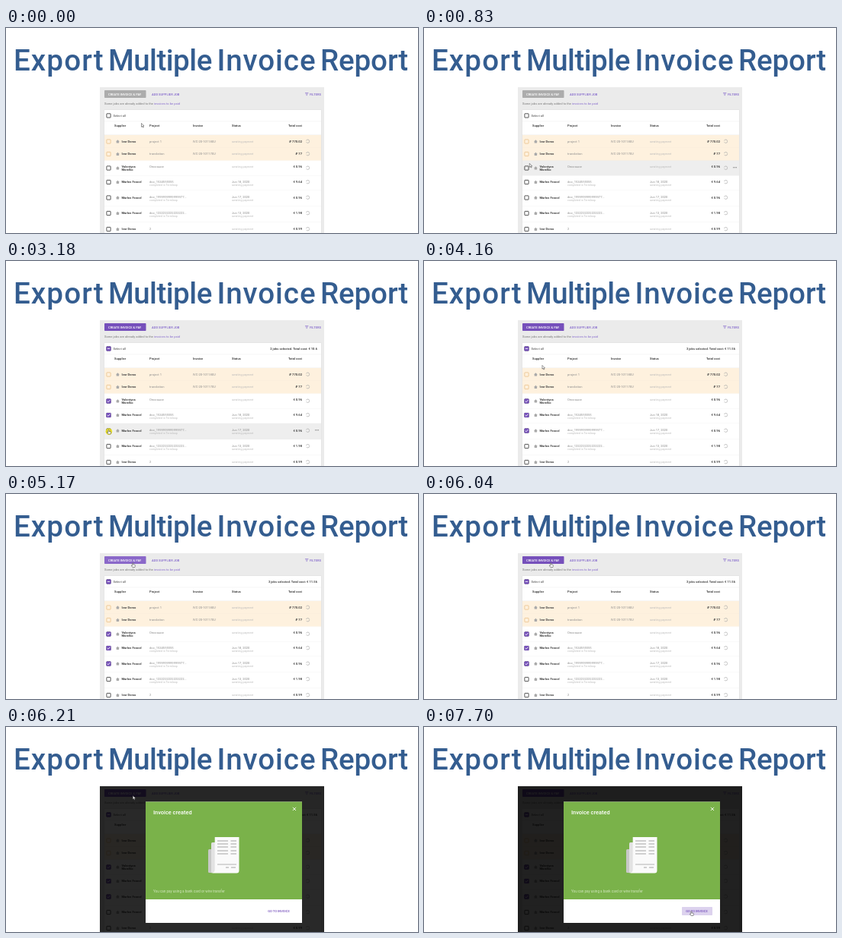
Recreate the animation shown at these times as an HTML page. Size 540x270 px, loop 8000 ms.

```html
<!DOCTYPE html>
<html lang="en">
<head>
<meta charset="utf-8">
<title>Export Multiple Invoice Report</title>
<style>
html, body { margin: 0; width: 100%; height: 100%; overflow: hidden; background: #fff; }
svg { display: block; width: 100vw; height: 100vh; font: 4.1px Roboto, sans-serif; }
.title { font-size: 38.5px; font-weight: 500; }
.bold { font-weight: 700; }
.medium { font-weight: 500; }
.small { font-size: 3.6px; }
.end { text-anchor: end; }
</style>
</head>
<body>
<svg id="stage" viewBox="0 0 540 270"></svg>
<script>
const LOOP = 8000;
const PURPLE = '#7650bb', LINK = '#8468cc', DARK = '#444', GREY = '#8c8c8c', PALE = '#b9b9b9';

const text = (x, y, str, fill = DARK, cls = '', extra = '') =>
  `<text x="${x}" y="${y}" fill="${fill}" class="${cls}" ${extra}>${str}</text>`;
const rect = (x, y, w, h, fill, extra = '') =>
  `<rect x="${x}" y="${y}" width="${w}" height="${h}" fill="${fill}" ${extra}/>`;
const line = (x1, y, x2, stroke, width = .5) =>
  `<path d="M${x1} ${y}H${x2}" stroke="${stroke}" stroke-width="${width}"/>`;

const rows = [
  { top: 141, mid: 149.5, name: ['Ivor Demo'], project: 'project 1', invoice: 'IVC-20-10118EU', cost: '₽ 770.02', added: true },
  { top: 157.5, mid: 166, name: ['Ivor Demo'], project: 'translation', invoice: 'IVC-20-10117EU', cost: '₽ 77', added: true },
  { top: 174.5, mid: 184.5, name: ['Valentyna', 'Morelko'], project: 'Описание', cost: '€ 0.96', checkAt: 1460 },
  { top: 194.5, mid: 203, name: ['Marlen Fennel'], project: 'doc_1534555555', date: 'Jun 18, 2020', cost: '€ 9.64', checkAt: 2490 },
  { top: 214, mid: 223.5, name: ['Marlen Fennel'], project: 'doc_1999999999999977...', date: 'Jun 17, 2020', cost: '€ 0.96', checkAt: 3330 },
  { top: 235, mid: 244, name: ['Marlen Fennel'], project: 'doc_1222222222222222...', date: 'Jun 13, 2020', cost: '€ 1.98' },
  { top: 255.5, mid: 265, name: ['Ivor Demo'], project: '2', cost: '€ 0.99' },
];
rows.forEach((row, i) => row.bottom = i < rows.length - 1 ? rows[i + 1].top : 270);

const checkbox = (y, stroke = DARK) =>
  rect(131.9, y - 2.6, 5.2, 5.2, 'none', `stroke="${stroke}" stroke-width=".9" rx=".4"`);
const checked = (id, y, mark) => `<g id="${id}" visibility="hidden">` +
  rect(131.5, y - 3, 6, 6, PURPLE, 'rx=".6"') +
  `<path transform="translate(134.5 ${y})" d="${mark}" fill="none" stroke="#fff" stroke-width=".9"/></g>`;

function rowMarkup(row, i) {
  const { top, mid, bottom, name, project, invoice, date, cost, added } = row;
  const base = mid + 1.4;
  const first = name.length > 1 ? mid - .9 : base;
  const detail = date ? mid + .9 : first;
  return rect(129, top, 284, bottom - top, added ? '#fef1de' : '#fff', `id="row${i}"`) +
    line(129, bottom, 413, added ? '#f3e3cc' : '#e8e8e8') +
    checkbox(mid, added ? '#ecc794' : DARK) +
    (row.checkAt ? checked('check' + i, mid, 'M-1.8 0L-.5 1.3L1.9-1.4') : '') +
    `<path d="M144 ${mid}l2.4-2.3l2.4 2.3h-.7v2h-3.4v-2z" fill="#aaa"/>` +
    name.map((part, n) => text(151.5, first + n * 4.7, part, DARK, 'bold')).join('') +
    text(188, detail, project, GREY) +
    (invoice ? text(245, base, invoice, GREY) : '') +
    (date ? text(188, mid + 4.7, 'completed in Termloop', PALE, 'small') +
            text(296, detail, date, GREY) : '') +
    text(296, date ? mid + 4.7 : first, 'awaiting payment', PALE, 'small') +
    text(388, first, cost, DARK, 'bold end') +
    `<circle cx="395.5" cy="${mid - .3}" r="2.2" fill="none" stroke="#aaa" stroke-width=".7" stroke-dasharray="5.2 1.7"/>` +
    `<path id="dots${i}" visibility="hidden" d="M405 ${mid - .8}h5" stroke="#777" stroke-width="1.1" stroke-dasharray="1.2 .7"/>`;
}

const receipt = () =>
  rect(265, 161, 14, 31, '#c8c8c8', 'rx="1.5"') +
  rect(269, 152, 14, 40, '#e2e2e2', 'rx="1.5"') +
  '<path d="M273.7 145H305.5V189q0 3.5-3.5 3.5H268q5.7 0 5.7-5z" fill="#fafafa"/>' +
  [150, 154, 158, 163, 167].map(y => line(277, y, 291, '#999', .9) + line(294.5, y, 302, '#999', .9)).join('') +
  line(277, 181, 302, '#aaa', .9) + line(288, 185, 292, '#999', .9) + line(295, 185, 301, '#999', .9);

const title = [['Export', 10, 1.1], ['Multiple', 134, -.5], ['Invoice', 276.5, .9], ['Report', 412, -.1]]
  .map(([word, x, spacing]) => text(x, 56, word, '#345d90', 'title', `letter-spacing="${spacing}"`)).join('');

const page = rect(123, 78, 294, 192, '#ebebeb') +
  rect(129, 82, 54.5, 10, '#acacac', 'id="create" rx=".8"') +
  text(134, 88.5, 'CREATE INVOICE &amp; PAY', '#fff', 'medium') +
  text(191, 88.5, 'ADD SUPPLIER JOB', LINK, 'medium') +
  `<path d="M392 85.6h4.4M392.8 87.1h2.8M393.6 88.6h1.2" stroke="${LINK}" stroke-width=".7"/>` +
  text(413, 88.5, 'FILTERS', LINK, 'medium end') +
  text(129, 101.3, `Some jobs are already added to the <tspan fill="${LINK}">invoices to be paid</tspan>`, '#777') +
  rect(128.6, 107.6, 284.8, 163, '#dcdcdc') + rect(129, 108, 284, 162, '#fff') +
  checkbox(115.4) + checked('checkAll', 115.4, 'M-1.7 0H1.7') +
  text(140.5, 116.9, 'Select all') +
  text(408, 116.9, '', DARK, 'bold end', 'id="summary"') +
  line(129, 122.8, 413, '#eee') + line(129, 140.8, 413, '#e4e4e4') +
  [[142, 'Supplier'], [188, 'Project'], [245, 'Invoice'], [296, 'Status']]
    .map(([x, label]) => text(x, 130.3, label, DARK, 'bold')).join('') +
  text(388, 130.3, 'Total cost', DARK, 'bold end') +
  rows.map(rowMarkup).join('');

const dialog = '<g id="dialog">' +
  rect(183, 98.5, 205, 159.5, '#fff') + rect(183, 98.5, 205, 128.5, '#7ab24a') +
  text(193, 115.2, 'Invoice created', '#fff', 'medium', 'font-size="7.4"') +
  '<path d="M375.8 105.8l4.2 4.2m0-4.2l-4.2 4.2" stroke="#fff" stroke-width=".9"/>' +
  receipt() +
  text(193, 218.2, 'You can pay using a bank card or wire transfer', '#d3e7bf', '', 'font-size="4.6"') +
  rect(338, 237, 40, 11, '#dcd2ee', 'id="goHover" rx=".8"') +
  text(343.3, 244, 'GO TO INVOICE', PURPLE, 'medium') + '</g>';

const pointer = '<circle id="press" cx=".4" cy="2.6" r="4.4" fill="#f0e400" opacity=".75"/>' +
  '<path id="arrow" d="M0 0V4.8L1.1 3.8L1.9 5.6L2.8 5.2L2 3.5H3.5z" fill="#fff" stroke="#333" stroke-width=".5"/>' +
  '<path id="hand" d="M-.5.4Q0-.4.5.4V2.4L2.8 2.9Q3.2 3.1 3.1 3.8L2.6 6H-.5L-2 3.7Q-1.6 2.9-.5 3.8z" fill="#fff" stroke="#333" stroke-width=".5"/>';

const stage = document.getElementById('stage');
stage.innerHTML = rect(0, 0, 540, 270, '#fff') + title + page +
  rect(123, 78, 294, 192, '#000', 'id="shade"') + dialog + `<g id="cursor">${pointer}</g>`;

const $ = id => document.getElementById(id);
const set = (id, name, value) => $(id).setAttribute(name, value);
const show = (id, on) => set(id, 'visibility', on ? 'visible' : 'hidden');
const clamp = v => Math.min(1, Math.max(0, v));
const between = (t, a, b) => t >= a && t < b;

// Each move: start, end, destination x, y
const moves = [
  [230, 1000, 134.5, 183.5], [1500, 2240, 134.3, 202], [2560, 3110, 134.5, 222],
  [3800, 4560, 166.3, 90.5], [6730, 7530, 349.6, 241], [7580, 7700, 350.4, 242.5],
];
const presses = [[1130, 1290], [2330, 2490], [3180, 3330], [5340, 5410]];
const summaries = ['', '1 job selected. Total cost: € 0.96',
  '2 jobs selected. Total cost: € 10.6', '3 jobs selected. Total cost: € 11.56'];

function cursorAt(t) {
  let x = 177.5, y = 125.5;
  for (const [start, end, toX, toY] of moves) {
    const p = 1 - (1 - clamp((t - start) / (end - start))) ** 1.6;
    x += (toX - x) * p;
    y += (toY - y) * p;
  }
  return [x, y];
}

function draw(t) {
  const [x, y] = cursorAt(t);
  let count = 0;
  rows.forEach((row, i) => {
    const hover = !row.added && t < 6040 && between(y, row.top, row.bottom);
    if (!row.added) set('row' + i, 'fill', hover ? '#eeeeee' : '#fff');
    show('dots' + i, hover);
    if (row.checkAt) {
      const on = t >= row.checkAt;
      show('check' + i, on);
      count += on;
    }
  });
  show('checkAll', count > 0);
  $('summary').textContent = summaries[count];
  set('create', 'fill', !count ? '#acacac' : between(t, 5170, 5410) ? '#8a68c9' : PURPLE);

  set('shade', 'opacity', t < 6120 ? 0 : t < 6210 ? .5 : t < 6280 ? .84 : .87);
  set('dialog', 'opacity', t < 6120 ? 0 : t < 6210 ? .5 : 1);
  const onGo = between(x, 338, 378) && between(y, 237, 248);
  show('goHover', onGo);

  const onBox = x < 138 && y > 178;
  const onCreate = t < 6120 && between(y, 82, 92);
  const hand = onBox || onCreate || onGo;
  show('hand', hand);
  show('arrow', !hand);
  show('press', presses.some(([a, b]) => between(t, a, b)));
  set('cursor', 'transform', `translate(${x.toFixed(2)} ${y.toFixed(2)})`);
}

const began = performance.now();
function tick() {
  draw((performance.now() - began) % LOOP);
  requestAnimationFrame(tick);
}
tick();
</script>
</body>
</html>
```
